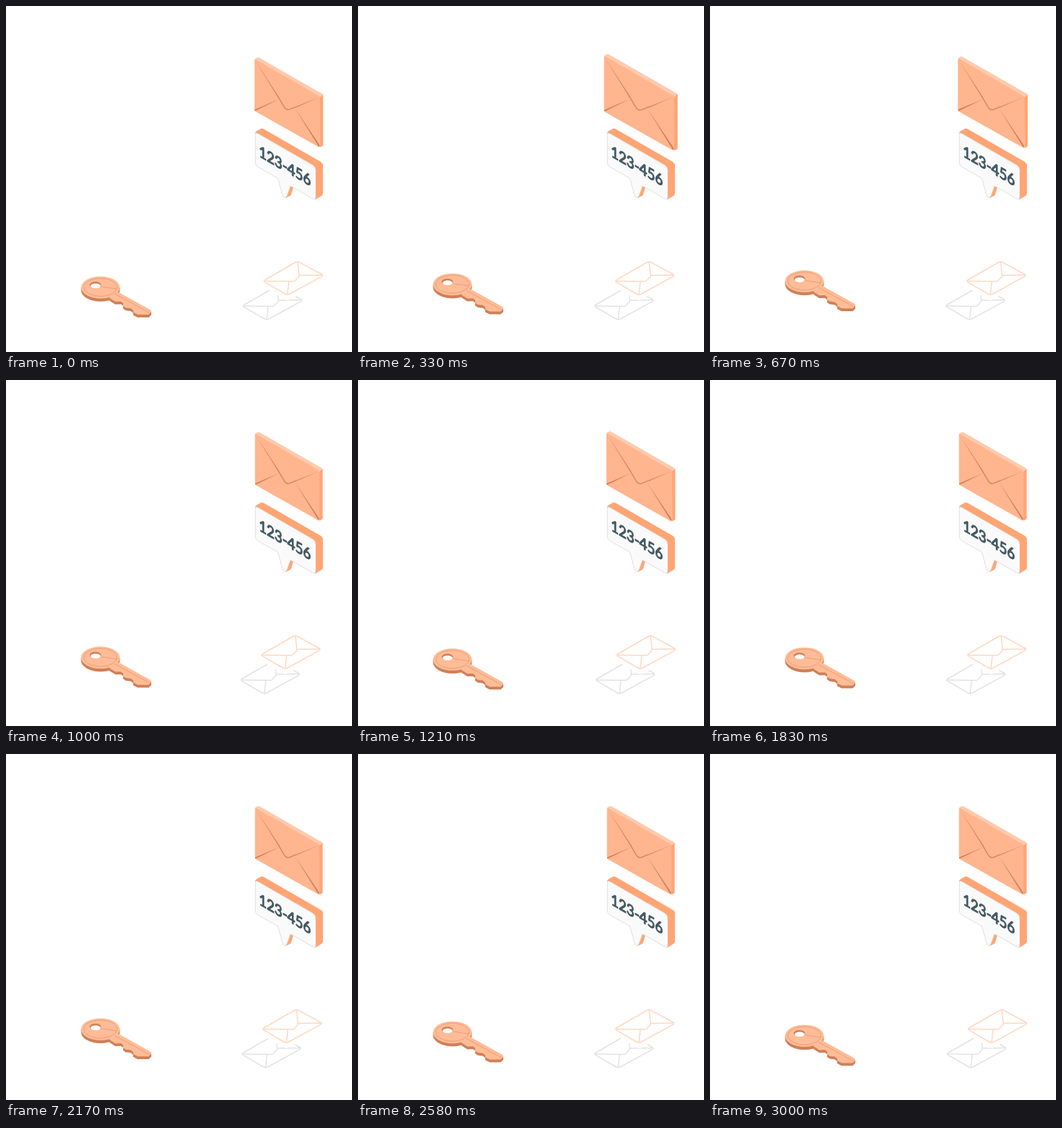
An HTML page for the animation above (3040 ms loop, 500 by 500 pixels).

```html
<!DOCTYPE html>
<html lang="en">
<head>
<meta charset="utf-8">
<title>Key, code and mail</title>
<style>
  html, body { margin: 0; width: 100%; height: 100%; overflow: hidden; background: #fff; }
  svg { display: block; width: 100vw; height: 100vh; }
  text { font: 400 22.5px Lato, "Open Sans", sans-serif; text-anchor: middle; fill: #455a64; stroke: #455a64; stroke-width: 1.3; stroke-linejoin: round; }
  .line { fill: none; stroke-linecap: round; stroke-linejoin: round; }
</style>
</head>
<body>
<svg viewBox="0 0 500 500">
  <defs>
    <path id="sheet" d="M375 395.500L418.500 370.500Q421.500 368.800 424.500 370.300L456 387.500Q459 389.300 456 391.200L410.500 416Q407 418 403.500 416L375 399.300Q371.500 397.500 375 395.500Z"/>
    <g id="mail" class="line" stroke-width="1.500">
      <use href="#sheet"/>
      <path d="M374 397.500L415.500 397.900Q417 397.900 418 397L423 391.800Q424 390.800 423.800 389.500L421.800 370M407 416.500L409 398.500M457 388.700L424 389.200"/>
    </g>
    <path id="blade" d="M158 413.500L163.500 414.500L208.500 439.500Q211 441.500 209 443.500L206 446.500H190.500L184 443.200L183.800 440L180 437.300L173 436.500L169 433.500L169.500 430L166 427.500L158 427.700L149 422Z"/>
  </defs>

  <g id="envelope">
    <path fill="#ffcaad" d="M359.800 78.500Q360 77.300 361.500 76.500L363.500 75.400Q365 74.700 366.700 75.700L456.300 127.200Q457.700 128.200 457.500 129.500L453 133Z"/>
    <path fill="#ffa574" d="M452.500 132.500L457.600 128.500V199.500Q457.600 201 456.200 201.700L453 203.300Z"/>
    <path fill="#ffb58e" d="M359.800 80Q359.800 77.300 362 78.500L451 130Q453 131.300 453 133.500V201.300Q453 203.800 450.700 202.600L362 152.500Q359.800 151.200 359.800 149Z"/>
    <path fill="#cf8058" d="M359.800 149.500L395.500 134.300L360.500 151.500ZM417 147L452.800 200.500L451.500 202.500ZM361 80L395.500 133L394.300 133.800ZM452.500 131.700L419 145.200L419.500 146.300Z"/>
    <path class="line" stroke="#d78a60" stroke-width="1.500" d="M394.500 133L402.500 146.500Q405.500 151 410.500 149L419 145.500"/>
  </g>

  <path fill="#ffa574" d="M360 184Q360 182 362 180.800L367.500 177.700Q370 176.500 372.500 177.800L455 225.300Q458 227.200 458 230.500V271Q458 273 456 274.300L447 279.700L414 261.500L415.300 262L412 272.500Q411.500 273.900 410.100 274.600L404 277.500L402 262Z"/>
  <path fill="#fafafa" stroke="#e0e0e0" d="M360.300 186.500Q360.300 182.300 364.200 184.500L443.500 230.200Q447.300 232.500 447.300 237V276.300Q447.300 280.700 443.500 278.600L411 260L406 274Q405 276.800 402.600 276.800Q400.500 276.500 399.600 273.500L393 249L364 232.500Q360.300 230.300 360.300 226Z"/>
  <text transform="matrix(.866 .5 0 1 403 239)">123-456</text>

  <g id="key">
    <g fill="#cf8058">
      <path d="M108.500 407.500V411.500A28 16 0 0 0 164.500 411.500V407.500Z"/>
      <use href="#blade" y="4"/>
      <path d="M183.800 440V447L190.500 450.500V446ZM206 446V450.500L210 446.800V442Z"/>
    </g>
    <g fill="#ffbc97">
      <use href="#blade"/>
      <ellipse cx="136.500" cy="407.300" rx="28" ry="15.900"/>
    </g>
    <g class="line" stroke="#e99a70" stroke-width=".9">
      <ellipse cx="136.500" cy="407" rx="24" ry="13"/>
      <path d="M157 416.500L207 443.500M137 406L160 409.500"/>
    </g>
    <ellipse cx="129.200" cy="403.700" rx="8.200" ry="4.800" fill="#cf8058"/>
    <ellipse cx="129.500" cy="405.100" rx="7.300" ry="3.500" fill="#fff"/>
  </g>

  <g id="mails">
    <use href="#mail" x="-30" y="36" stroke="#e2e2e2"/>
    <use href="#sheet" y="8" fill="#fff"/>
    <use href="#sheet" fill="#fff"/>
    <use href="#mail" stroke="#ffd6bf"/>
  </g>
</svg>
<script>
  const LOOP = 3040, CYCLE = 3, FPS = 24;
  const [envelope, key, mails] = ["envelope", "key", "mails"].map(id => document.getElementById(id));

  // Linear interpolation over [position, value] stops.
  function track(stops, p) {
    const i = Math.max(1, stops.findIndex(s => s[0] >= p));
    const [a, from] = stops[i - 1], [b, to] = stops[i];
    return from + (to - from) * (p - a) / (b - a);
  }

  const beat = [[0, 1], [.1, 1.1], [.3, 1], [.4, 1], [.5, 1.1], [.6, 1], [1, 1]];
  const shake = [0, -1, 2, -4, 4, -4, 4, -4, 2, -1, 0].map((x, i) => [i / 10, x]);
  const lift = [[0, 0], [.5, -10], [1, 0]];

  function draw(now) {
    // Steps begin at times rounded to 10 ms; the last one rests at the end of the cycle.
    const step = Math.floor((now % LOOP + 5) * FPS / 1000);
    const p = Math.min((step + 1) / FPS / CYCLE, 1), half = p * 2 % 1;
    envelope.setAttribute("transform", `translate(409 139.300) scale(${track(beat, p)}) translate(-409 -139.300)`);
    key.setAttribute("transform", `translate(0 ${track(lift, half)})`);
    mails.setAttribute("transform", `translate(${track(shake, half)} 0)`);
  }

  const start = performance.now();
  function tick() {
    draw(performance.now() - start);
    requestAnimationFrame(tick);
  }
  tick();
</script>
</body>
</html>
```
